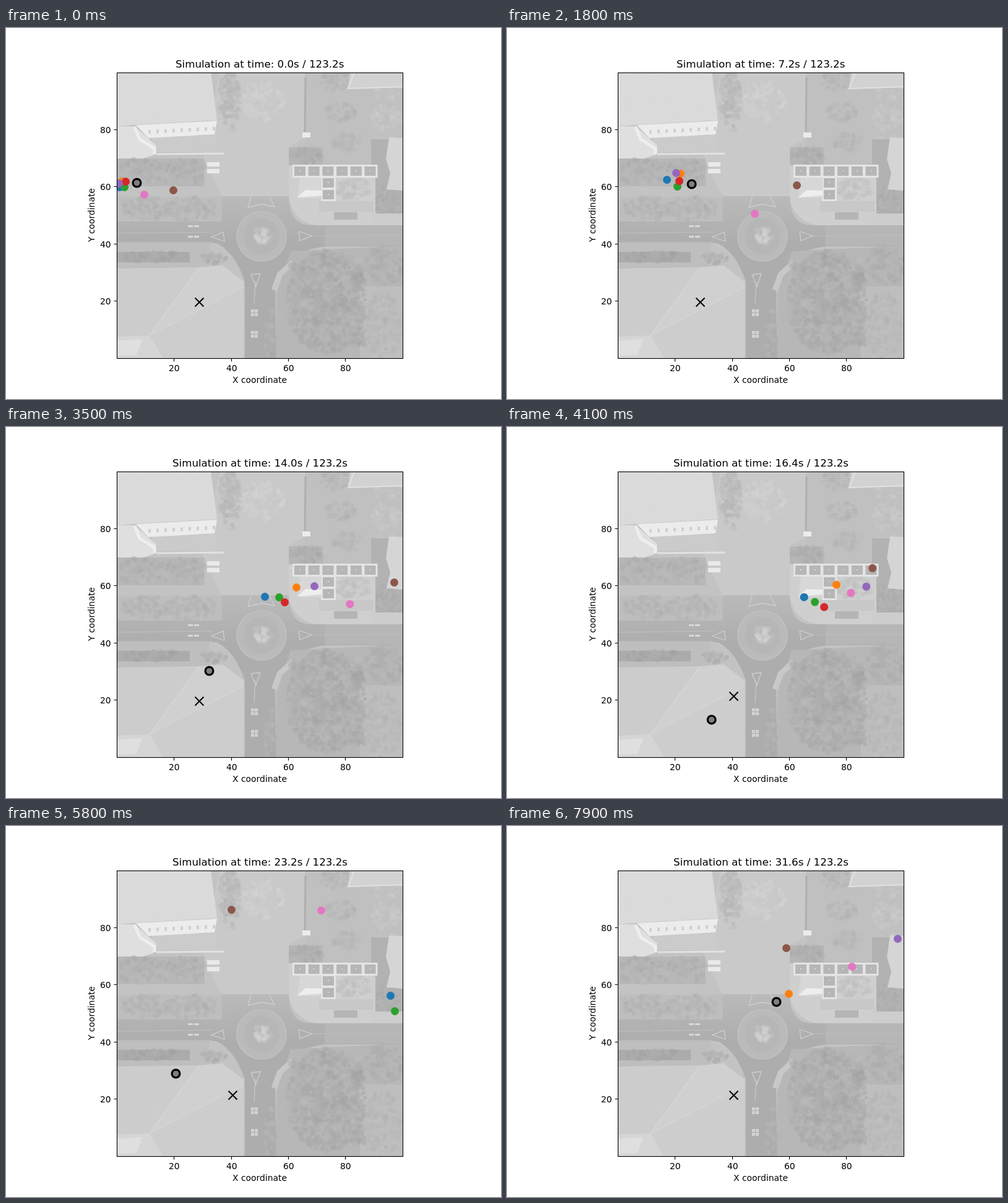
Recreate the animation shown at these times as an HTML page with a canvas. Size 800 by 600 pixels, loop 8 s.

```html
<!DOCTYPE html>
<html lang="en">
<head>
<meta charset="utf-8">
<title>Simulation</title>
<style>
html, body { margin: 0; width: 100%; height: 100%; overflow: hidden; background: #fff; }
canvas { display: block; }
</style>
</head>
<body>
<canvas id="stage" width="800" height="600"></canvas>
<script>
const STEP = 100, STEPS = 80;
const LEFT = 179, TOP = 72, SIDE = 463, UNIT = 4.62;
const ctx = document.getElementById('stage').getContext('2d');

// ---- aerial view, painted once ----
const ground = document.createElement('canvas');
ground.width = 800;
ground.height = 600;
const g = ground.getContext('2d');
const grey = v => `rgb(${v},${v},${v})`;
let seed = 7;
const rand = () => (seed = (seed * 16807) % 2147483647) / 2147483647;

function trace(pts) {
  g.beginPath();
  for (let i = 0; i < pts.length; i += 2) g.lineTo(pts[i], pts[i + 1]);
}
function poly(v, ...pts) {
  trace(pts);
  g.fillStyle = grey(v);
  g.fill();
}
function line(v, width, ...pts) {
  trace(pts);
  g.strokeStyle = grey(v);
  g.lineWidth = width;
  g.stroke();
}
function box(v, x, y, w, h) {
  g.fillStyle = grey(v);
  g.fillRect(x, y, w, h);
}
function disc(v, x, y, r) {
  g.beginPath();
  g.arc(x, y, r, 0, 7);
  g.fillStyle = grey(v);
  g.fill();
}
// Mottled foliage inside an ellipse
function leaves(v, x, y, rx, ry) {
  g.globalAlpha = .4;
  for (let i = rx * ry / 6; i > 0; i--) {
    const a = rand() * 2 * Math.PI, d = Math.sqrt(rand());
    disc(Math.round(v - 10 + 20 * rand()), x + rx * d * Math.cos(a), y + ry * d * Math.sin(a), 2 + 3 * rand());
  }
  g.globalAlpha = 1;
}
// Roof with fine parallel tile rows
function roof(v, angle, ...pts) {
  poly(v, ...pts);
  g.save();
  trace(pts);
  g.clip();
  g.translate(pts[0], pts[1]);
  g.rotate(angle);
  for (let y = -300; y < 300; y += 3) line(v + 4, 1, -300, y, 300, y);
  g.restore();
}

function paintNorth() {
  // plaza and tree
  poly(201, 345, 72, 483, 72, 483, 178, 457, 192, 457, 275, 350, 275, 318, 212);
  leaves(184, 361, 120, 19, 48);
  leaves(206, 416, 118, 34, 33);

  // north-west building
  box(203, 236, 174, 104, 27);
  roof(217, -.1, 179, 72, 331, 72, 341, 149, 215, 156, 179, 159);
  poly(236, 210, 157, 341, 150, 337, 172, 230, 178);
  for (let x = 230; x < 335; x += 13) box(208, x, 165 - (x - 230) * .05, 4, 6);
  poly(223, 179, 159, 208, 159, 243, 190, 240, 205, 222, 211, 179, 211);
  line(238, 5, 208, 160, 216, 180, 240, 195, 240, 204);
  line(226, 3, 243, 204, 352, 203);

  // hedges and parked vans
  box(184, 179, 211, 142, 45);
  box(190, 179, 273, 170, 40);
  for (const x of [215, 285]) {
    leaves(176, x, 224, 36, 12);
    leaves(180, x, 245, 36, 8);
    leaves(181, x + 12, 292, 42, 19);
  }
  for (const y of [217, 228]) box(234, 325, y, 20, 7);

  // north-east garden
  box(192, 484, 72, 158, 150);
  for (let y = 85; y < 200; y += 50) {
    leaves(184, 515 + y / 5, y, 24, 16);
    leaves(198, 615, y + 10, 24, 22);
  }
  line(174, 3, 484, 80, 483, 168);
  box(236, 479, 169, 13, 8);
  poly(210, 556, 72, 642, 72, 642, 96, 553, 98);
  line(225, 2, 563, 72, 553, 98, 642, 95);
  box(182, 457, 193, 55, 29);
  leaves(174, 486, 206, 27, 13);
  box(178, 590, 180, 52, 120);
  leaves(176, 616, 285, 22, 28);
  poly(213, 619, 177, 642, 178, 642, 263, 615, 261, 621, 235, 614, 212);
}

function paintPatio() {
  g.fillStyle = grey(207);
  g.beginPath();
  g.roundRect(457, 222, 140, 97, [0, 0, 0, 50]);
  g.fill();
  box(205, 590, 300, 52, 19);
  box(200, 506, 280, 88, 17);
  box(181, 530, 298, 38, 12);
  leaves(194, 562, 260, 28, 18);

  // pergola frames
  const cell = (x, y) => {
    box(228, x, y, 24, 21);
    box(182, x + 3, y + 3, 18, 15);
    box(215, x + 11, y + 9, 2, 2);
  };
  for (let i = 0; i < 6; i++) cell(463 + 22.7 * i, 221);
  for (const y of [240, 259]) cell(509, y);
  poly(215, 475, 242, 510, 242, 510, 275, 471, 275);
  poly(238, 471, 274, 484, 262, 510, 263, 510, 271);
}

function paintRoads() {
  const road = new Path2D('M179 313H349V272H457Q457 318 492 319H642V353H520Q450 358 435 420L437 535H386V410Q370 362 340 348H179Z');
  const shade = g.createLinearGradient(0, 270, 0, 350);
  shade.addColorStop(0, grey(186));
  shade.addColorStop(1, grey(173));
  g.fillStyle = shade;
  g.fill(road);
  box(182, 515, 319, 127, 33);
  line(194, 1, 179, 332, 334, 330);
  line(190, 1, 495, 336, 642, 335);
  line(200, 1.2, 179, 347, 330, 347, 352, 356);

  // roundabout with a star bed
  const x = 413, y = 337;
  disc(191, x, y, 41);
  disc(186, x, y, 39);
  disc(182, x, y, 29);
  leaves(204, x, y, 16, 13);
  leaves(212, x, y, 12, 9);

  // splitter islands
  for (const turn of [0, 1, 2]) {
    g.save();
    g.translate(turn === 1 ? x - 10 : x, y);
    g.rotate(turn * Math.PI / 2);
    line(207, 1.3, 60, -8, 81, -1, 62, 7, 60, -8);
    g.restore();
  }
  line(207, 1.3, 398, 266, 391, 290, 413, 285, 434, 289, 421, 264);
  line(200, 1.2, 403, 410, 401, 446);
  for (const cx of [294, 304]) for (const cy of [319, 336]) box(216, cx, cy, 8, 3);
}

function paintSouth() {
  // sidewalk, hedge and big roof
  box(190, 179, 348, 150, 41);
  box(172, 179, 362, 118, 17);
  leaves(168, 238, 370, 57, 8);
  leaves(174, 335, 372, 22, 9);
  roof(203, -.5, 179, 389, 312, 387, 232, 497, 179, 500);
  roof(207, .65, 312, 387, 350, 384, 384, 410, 384, 419, 232, 497);
  roof(204, .4, 384, 419, 384, 535, 255, 535, 232, 497);
  poly(213, 179, 499, 232, 497, 255, 535, 179, 535);
  line(215, 1.3, 312, 387, 232, 497, 384, 419);
  poly(223, 179, 506, 220, 503, 211, 529, 179, 530);

  // verge, waiting cars, trees and field
  poly(183, 460, 361, 642, 352, 642, 535, 437, 535, 437, 430);
  line(200, 9, 433, 424, 442, 399, 464, 379);
  leaves(177, 427, 493, 9, 42);
  for (const y of [455, 490])
    for (const dx of [0, 6])
      for (const dy of [0, 6]) box(211, 396 + dx, y + dy, 5, 5);
  box(190, 572, 418, 70, 117);
  leaves(186, 606, 480, 34, 54);
  leaves(172, 518, 443, 64, 84);
  leaves(176, 612, 383, 32, 32);
  for (let i = 0; i < 30; i++) leaves(166 + 16 * rand(), 465 + 110 * rand(), 370 + 140 * rand(), 10, 10);
}

function paintGround() {
  g.beginPath();
  g.rect(LEFT, TOP, SIDE, SIDE);
  g.clip();
  box(195, LEFT, TOP, SIDE, SIDE);
  g.filter = 'blur(0.7px)';
  paintNorth();
  paintPatio();
  paintRoads();
  paintSouth();
}

// ---- moving markers: key points as [step, x, y] ----
const dots = [
  ['#1f77b4', [[0, 183, 257], [18, 258, 245], [35, 418, 274], [48, 549, 272], [58, 621, 274]]],
  ['#ff7f0e', [[0, 187, 248], [18, 280, 235], [35, 469, 259], [48, 600, 243], [56, 660, 226], [67, 560, 226], [79, 455, 271]]],
  ['#2ca02c', [[0, 191, 257], [18, 275, 256], [35, 441, 275], [48, 558, 291], [58, 628, 299]]],
  ['#d62728', [[0, 193, 248], [18, 278, 247], [35, 450, 283], [48, 586, 295]]],
  ['#9467bd', [[0, 182, 251], [18, 273, 234], [35, 498, 257], [45, 627, 253], [58, 720, 215], [79, 631, 182]]],
  ['#8c564b', [[0, 270, 262], [18, 468, 254], [35, 627, 251], [48, 501, 190], [58, 364, 135], [67, 460, 128], [72, 490, 155], [79, 451, 197]]],
  ['#e377c2', [[0, 223, 269], [18, 400, 300], [38, 568, 279], [48, 482, 223], [58, 509, 136], [70, 604, 158], [79, 557, 227]]]
];
const leader = [[0, 211, 250], [18, 298, 252], [27, 324, 307], [35, 328, 394], [44, 330, 503], [48, 324, 487], [58, 274, 400], [67, 283, 286], [79, 435, 284]];

// Smooth curve through the key points, then straight on
function along(path, n, c) {
  const last = path.length - 1;
  const chord = i => (path[i + 1][c] - path[i][c]) / (path[i + 1][0] - path[i][0]);
  const slope = i =>
    i === 0 ? 2 * chord(0) - slope(1) :
    i === last ? 2 * chord(last - 1) - slope(last - 1) :
    (path[i + 1][c] - path[i - 1][c]) / (path[i + 1][0] - path[i - 1][0]);
  const end = path[last];
  if (n >= end[0]) return end[c] + slope(last) * (n - end[0]);
  const i = path.findIndex(p => p[0] > n) - 1;
  const h = path[i + 1][0] - path[i][0], u = (n - path[i][0]) / h, v = 1 - u;
  return v * v * ((1 + 2 * u) * path[i][c] + u * h * slope(i)) +
    u * u * ((1 + 2 * v) * path[i + 1][c] - v * h * slope(i + 1));
}

function marker(path, n, r, fill, edge = 0) {
  ctx.beginPath();
  ctx.arc(along(path, n, 1) + .5, along(path, n, 2) + .5, r, 0, 7);
  ctx.fillStyle = fill;
  ctx.fill();
  ctx.lineWidth = edge;
  if (edge) ctx.stroke();
}

function cross(x, y, r) {
  ctx.beginPath();
  for (const s of [-r, r]) {
    ctx.moveTo(x - r, y - s);
    ctx.lineTo(x + r, y + s);
  }
  ctx.lineWidth = 2;
  ctx.stroke();
}

// Text starts on a whole pixel; anchor is 0.5 for centre, 1 for right
function label(text, x, y, size = 13.89, anchor = .5) {
  ctx.font = `${size}px "DejaVu Sans", sans-serif`;
  ctx.fillStyle = '#000';
  ctx.fillText(text, Math.round(x - ctx.measureText(text).width * anchor), Math.round(y));
}

function axes() {
  ctx.lineWidth = 1.1;
  ctx.strokeRect(LEFT + .5, TOP + .5, SIDE - 1, SIDE - 1);
  ctx.beginPath();
  for (let v = 20; v < 100; v += 20) {
    const x = Math.floor(179.3 + v * UNIT) + .5, y = Math.floor(534.1 - v * UNIT) + .5;
    ctx.moveTo(x, 535);
    ctx.lineTo(x, 539.5);
    ctx.moveTo(LEFT, y);
    ctx.lineTo(174.5, y);
    label(v, x, 555);
    label(v, 169.5, y + 5, 13.89, 1);
  }
  ctx.stroke();
  label('X coordinate', 410, 574);
  ctx.save();
  ctx.translate(143, 303);
  ctx.rotate(-Math.PI / 2);
  label('Y coordinate', 0, 0);
  ctx.restore();
}

function draw(n) {
  ctx.fillStyle = '#fff';
  ctx.fillRect(0, 0, 800, 600);
  ctx.drawImage(ground, 0, 0);
  ctx.strokeStyle = '#000';
  ctx.save();
  ctx.beginPath();
  ctx.rect(LEFT, TOP, SIDE, SIDE);
  ctx.clip();
  for (const [color, path] of dots) marker(path, n, 6.5, color);
  marker(leader, n, 6.4, '#7f7f7f', 3.2);
  ctx.restore();
  if (n < 36) cross(312.5, 443.5, 7);
  else cross(366.5, 435.5, 7);
  axes();
  label(`Simulation at time: ${(n * .4).toFixed(1)}s / 123.2s`, 410, 64, 16.67);
}

function tick() {
  draw(Math.floor(performance.now() / STEP) % STEPS);
  requestAnimationFrame(tick);
}
paintGround();
tick();
</script>
</body>
</html>
```
